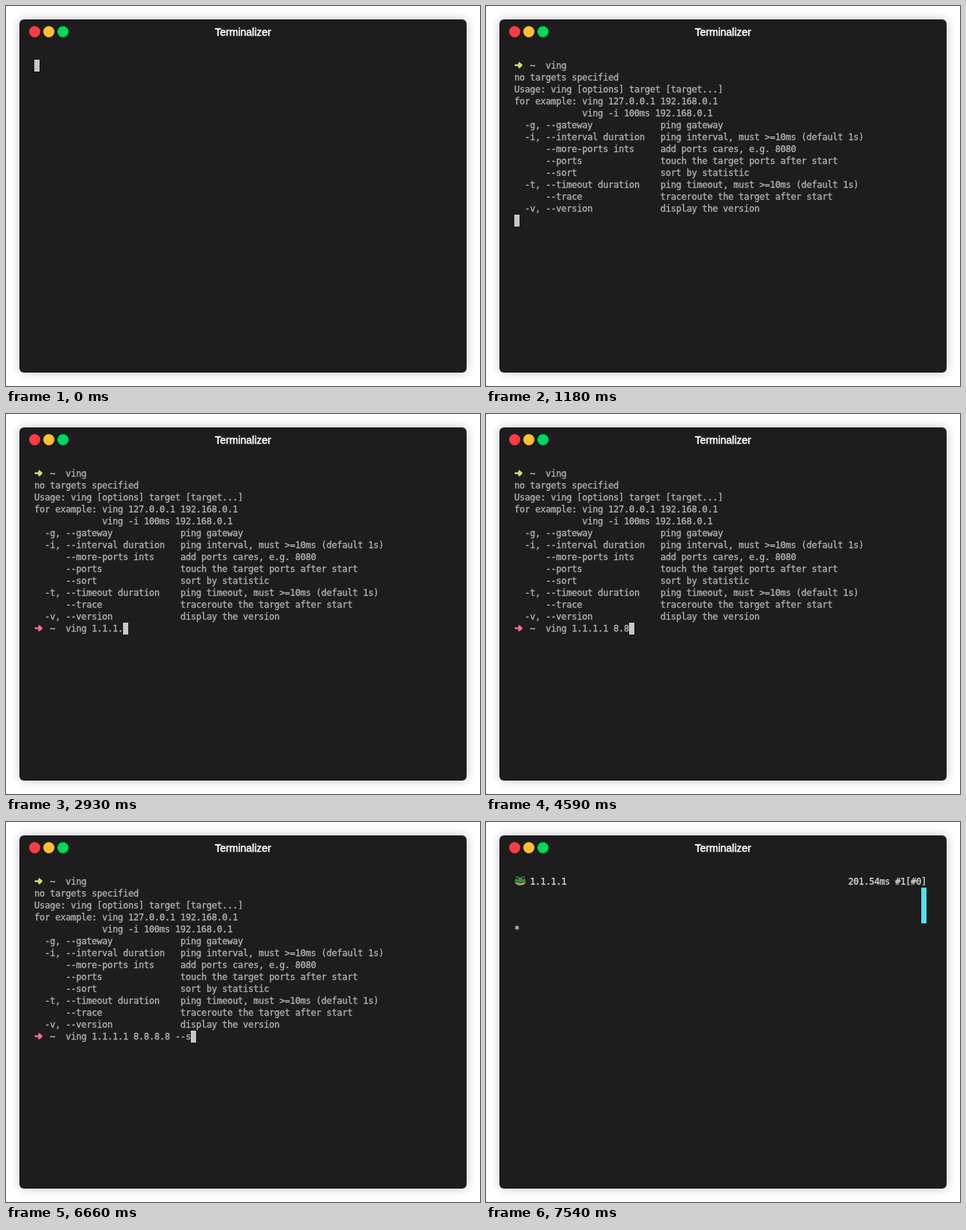
An HTML page that plays this animation: 636x510 px, repeating every 8000 ms.

```html
<!DOCTYPE html>
<html lang="en">
<head>
<meta charset="utf-8">
<title>Terminal session</title>
<style>
  html, body { margin: 0; width: 100%; height: 100%; overflow: hidden; background: #fff; }
  #window {
    position: absolute; left: 18px; top: 18px; width: 600px; height: 474px;
    border-radius: 6px; background: #1d1d1d; box-shadow: 0 0 12px rgba(0, 0, 0, .26);
  }
  .button { position: absolute; top: 9px; width: 15px; height: 15px; border-radius: 50%; }
  #title {
    position: absolute; left: 0; top: 9px; width: 100%; text-align: center; color: #fff;
    font: 14px/16px "Liberation Sans", Arial, sans-serif; -webkit-text-stroke: .5px #fff;
  }
  #screen {
    position: absolute; left: 20px; top: 54px; color: #afafaf; white-space: pre;
    font: 12px/16px "DejaVu Sans Mono", Menlo, monospace; -webkit-text-stroke: .35px;
    font-variant-ligatures: none; letter-spacing: calc(7px - 1ch);
  }
  #screen > * { position: absolute; left: 0; top: 0; }
  .line { position: absolute; height: 16px; }
  .dir { color: #b9cacd; }
  .arrow { position: absolute; left: 0; width: 14px; height: 16px; fill: none;
    stroke-width: 2.5; stroke-linecap: round; stroke-linejoin: round; }
  #cursor { width: 7px; height: 16px; background: #c7c7c7; }
  #stats { color: #d5d5d0; }
  #bar { position: absolute; left: 546px; top: 16px; width: 7px; height: 48px; background: #4de3f8; }
  #frog { position: absolute; left: 0; top: 0; width: 16px; height: 14px; }
</style>
</head>
<body>
<div id="window">
  <i class="button" style="left:13px;background:#ff3b47"></i>
  <i class="button" style="left:32px;background:#ffbf36"></i>
  <i class="button" style="left:51px;background:#00d75a"></i>
  <div id="title">Terminalizer</div>
  <div id="screen">
    <div id="shell"></div>
    <div id="help"></div>
    <div id="stats">
      <svg id="frog" viewBox="0 0 16 14">
        <path d="M1.8 4.5C1.2 0 6 0 6.3 2.6h3.4C10 0 14.8 0 14.2 4.5 17.5 9 14 13 8 13S-1.5 9 1.8 4.5Z" fill="#3f8745"/>
        <path d="M1 8.3Q8 10.5 15 8.3Q14 13 8 13T1 8.3Z" fill="#a99a5c"/>
        <path d="M.8 8.2Q8 10.6 15.2 8.2" fill="none" stroke="#26452a"/>
        <g fill="#1a2a1c"><circle cx="4" cy="3.5" r="1.5"/><circle cx="12" cy="3.5" r="1.5"/></g>
      </svg>
      <div id="bar"></div>
    </div>
    <div id="cursor"></div>
  </div>
</div>
<script>
const LOOP = 8000, COL = 7, ROW = 16;
const $ = id => document.getElementById(id);
const show = (el, on) => { el.style.visibility = on ? 'visible' : 'hidden'; };

const HELP = `no targets specified
Usage: ving [options] target [target...]
for example: ving 127.0.0.1 192.168.0.1
             ving -i 100ms 192.168.0.1
  -g, --gateway             ping gateway
  -i, --interval duration   ping interval, must >=10ms (default 1s)
      --more-ports ints     add ports cares, e.g. 8080
      --ports               touch the target ports after start
      --sort                sort by statistic
  -t, --timeout duration    ping timeout, must >=10ms (default 1s)
      --trace               traceroute the target after start
  -v, --version             display the version`;
const COMMAND = 'ving 1.1.1.1 8.8.8.8 --sort';

// Bursts of typing: first key, last key, number of keys
const BURSTS = [
  [1900, 2300, 5], [2500, 2500, 1], [2650, 2930, 5],
  ...[3370, 3620, 4080, 4310, 4590, 4830, 5080, 5320, 5590, 5800, 6280, 6420].map(t => [t, t, 1]),
  [6660, 6990, 4]
];
const keys = BURSTS.flatMap(([from, to, n]) =>
  Array.from({ length: n }, (_, i) => n > 1 ? from + (to - from) * i / (n - 1) : from));

function addText(parent, row, col, text, cls = '') {
  const el = document.createElement('div');
  el.className = 'line ' + cls;
  el.style.left = col * COL + 'px';
  el.style.top = row * ROW + 'px';
  el.textContent = text;
  parent.append(el);
  return el;
}

function addPrompt(row, color) {
  const box = document.createElement('div');
  box.style.cssText = `position:absolute;left:0;top:${row * ROW}px`;
  box.innerHTML = `<svg class="arrow" viewBox="0 0 14 16" stroke="${color}">
    <path d="M1.6 7.5H9M6.6 4.6L9.6 7.5L6.6 10.4Z"/></svg>`;
  addText(box, 0, 3, '~', 'dir');
  const input = addText(box, 0, 6, '');
  $('shell').append(box);
  return { box, input };
}

const first = addPrompt(0, '#c3e66f');
const second = addPrompt(13, '#f56c98');
HELP.split('\n').forEach((text, i) => addText($('help'), i + 1, 0, text));
addText($('stats'), 0, 3, '1.1.1.1');
addText($('stats'), 0, 64, '201.54ms #1[#0]');
addText($('stats'), 4, 0, '*');

function cursorAt(t, typed) {
  if (t < 40) return [0, 0];
  if (t < 620) return [0, 6];
  if (t < 980) return [0, 10];
  if (t < 1180) return [1, 0];
  if (t < 1230) return [13, 0];
  if (t < 7220) return [13, 6 + typed];
  return t < 7240 ? [14, 0] : [0, 0];
}

function draw(t) {
  const inShell = t < 7240;
  const typed = keys.filter(k => k <= t).length;
  const [row, col] = cursorAt(t, typed);
  first.input.textContent = t >= 620 ? 'ving' : '';
  second.input.textContent = COMMAND.slice(0, typed);
  show(first.box, inShell && t >= 40);
  show(second.box, inShell && t >= 1230);
  show($('help'), inShell && t >= 1180);
  show($('stats'), t >= 7540);
  show($('cursor'), t < 7340);
  $('cursor').style.left = col * COL + 'px';
  $('cursor').style.top = row * ROW + 'px';
}

const start = performance.now();
function tick() {
  draw((performance.now() - start) % LOOP);
  requestAnimationFrame(tick);
}
tick();
</script>
</body>
</html>
```
